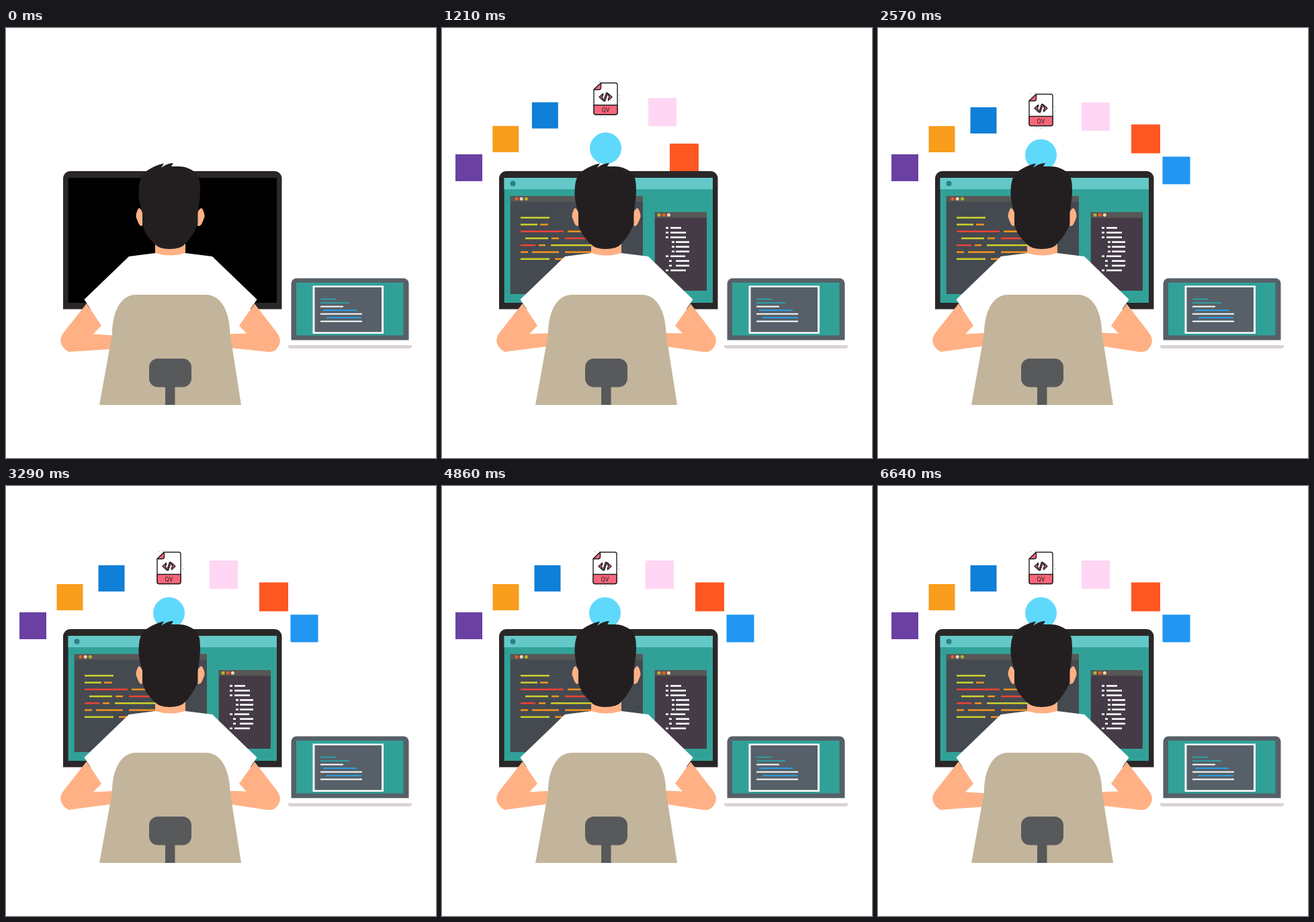
Write an HTML page with a canvas that moves like this. It is 640 px wide and 640 px high and loops after 6.71 s.

```html
<!DOCTYPE html>
<html lang="en">
<head>
<meta charset="utf-8">
<title>At the desk</title>
<style>
  html, body { margin: 0; width: 100%; height: 100%; overflow: hidden; background: #fff; }
  canvas { display: block; width: 640px; height: 640px; }
</style>
</head>
<body>
<canvas id="stage" width="640" height="640"></canvas>
<script>
const ctx = document.getElementById('stage').getContext('2d');
const LOOP = 6710, STEP = LOOP / 94;
const SKIN = '#ffb185', TEAL = '#31a198', SLATE = '#576068';
const YELLOW = '#cfd22a', ORANGE = '#f7931e', RED = '#ef4136', BLUE = '#2a9fe8';
const HUB = { x: 232, y: 290 };

const clamp = v => Math.max(0, Math.min(1, v));
const progress = (t, start, length) => clamp((t - start) / length);
const outCubic = p => 1 - (1 - p) ** 3;
const outBack = p => 1 + 2.70158 * (p - 1) ** 3 + 1.70158 * (p - 1) ** 2;

function rect(x, y, w, h, color) {
  ctx.fillStyle = color;
  ctx.fillRect(x, y, w, h);
}

function round(x, y, w, h, radius, color) {
  ctx.fillStyle = color;
  ctx.beginPath();
  ctx.roundRect(x, y, w, h, radius);
  ctx.fill();
}

function disc(x, y, r, color) {
  ctx.fillStyle = color;
  ctx.beginPath();
  ctx.arc(x, y, r, 0, Math.PI * 2);
  ctx.fill();
}

function shape(d, color, outline) {
  const path = new Path2D(d);
  ctx.fillStyle = color;
  ctx.fill(path);
  if (outline) {
    ctx.strokeStyle = outline;
    ctx.lineWidth = 1.4;
    ctx.lineJoin = 'round';
    ctx.stroke(path);
  }
}

const bar = (x1, x2, y, h, color) => rect(x1, y - h / 2, x2 - x1, h, color);

const tile = (size, color) => () => rect(-size / 2, -size / 2, size, size, color);

function documentIcon() {
  shape('M-7 -23 H15 Q17.5 -23 17.5 -20 V21 Q17.5 24 15 24 H-15 Q-17.5 24 -17.5 21 V-13 Z', '#fff', '#231f20');
  shape('M-17.5 10 H17.5 V21 Q17.5 24 15 24 H-15 Q-17.5 24 -17.5 21 Z', '#f9667a', '#231f20');
  shape('M-7 -23 V-16 Q-7 -13 -10 -13 H-17.5 Z', '#f9667a', '#231f20');
  shape('M-4 -7 L-9.5 -2 L-4 3 V0 L-6 -2 L-4 -4 Z M4 -7 L9.5 -2 L4 3 V0 L6 -2 L4 -4 Z', '#f9667a', '#231f20');
  shape('M1 -8 H3 L-1 4 H-3 Z', '#f9667a', '#231f20');
  ctx.fillStyle = '#231f20';
  ctx.font = '9px Roboto, Arial, sans-serif';
  ctx.textAlign = 'center';
  ctx.fillText('QV', 0, 20.5);
  for (const [x, y] of [[-15, -24], [-9, -25], [20, -4], [21, 2], [-6, 27], [0, 28]]) {
    disc(x, y, 0.7, '#8cabb5');
  }
}

const icons = [
  { x: 40, y: 208, start: 385, draw: tile(40, '#6a41a3') },
  { x: 95, y: 165.5, start: 528, draw: tile(39, '#f99d1c') },
  { x: 157, y: 137.5, start: 652, draw: tile(39, '#0f7fd8') },
  { x: 242.5, y: 189, start: 785, draw: () => disc(0, 0, 23.5, '#5ed9fc') },
  { x: 242.5, y: 121.5, start: 785, draw: documentIcon },
  { x: 324, y: 132, start: 918, draw: tile(42, '#ffd6f3') },
  { x: 398.5, y: 165, start: 1052, draw: tile(43, '#ff5722') },
  { x: 444, y: 212, start: 1180, draw: tile(41, '#2196f3') }
];

function drawIcons(t) {
  for (const icon of icons) {
    if (t < icon.start) continue;
    const k = outBack(progress(t, icon.start, 708));
    ctx.save();
    ctx.translate(HUB.x + (icon.x - HUB.x) * k, HUB.y + (icon.y - HUB.y) * k);
    icon.draw();
    ctx.restore();
  }
}

// Each row lists runs of: start x, end x, colour
const codeRows = [
  [[117, 160, YELLOW]],
  [[117, 142, YELLOW], [146, 158, ORANGE]],
  [[117, 181, RED], [187, 225, ORANGE]],
  [[124, 158, YELLOW], [163, 174, ORANGE], [183, 225, RED]],
  [[117, 139, RED], [144, 154, ORANGE], [162, 225, YELLOW]],
  [[117, 128, ORANGE], [134, 174, ORANGE], [183, 225, ORANGE]],
  [[117, 160, YELLOW], [168, 190, ORANGE]]
];

// Each row: bullet x, text start, text end
const listRows = [
  [333, 340, 356], [333, 340, 363], [333, 340, 363],
  [342, 348, 368], [342, 348, 368], [342, 348, 368],
  [333, 340, 362], [338, 348, 368], [338, 348, 368], [333, 340, 363]
];

function pane(x, y, w, h, color, dots, alpha, content) {
  ctx.save();
  ctx.globalAlpha = alpha;
  ctx.beginPath();
  ctx.rect(x, y, w, h);
  ctx.clip();
  rect(x, y, w, h, color);
  content();
  ctx.globalAlpha = alpha;
  rect(x, y, w, 8.5, '#575756');
  dots.forEach((c, i) => disc(x + (w > 100 ? 9.5 : 6.5) + i * 7.2, y + 4.3, 2.5, c));
  ctx.restore();
}

function drawMonitor(t) {
  round(85, 213, 325.5, 205.5, [11, 11, 0, 0], '#2b2728');
  rect(92.5, 223, 310.5, 186, '#000');
  ctx.save();
  ctx.globalAlpha = progress(t, 40, 260);
  rect(92.5, 223, 310.5, 186, TEAL);
  rect(92.5, 223, 310.5, 17, '#65c8c8');
  disc(105.5, 231.5, 4, '#2d7f87');
  ctx.restore();

  pane(101.5, 250, 197.5, 146, '#444a50', ['#f15a24', '#fbd3a8', '#b5b52a'], progress(t, 200, 260), () => {
    const k = outCubic(progress(t, 600, 410));
    ctx.globalAlpha = k;
    codeRows.forEach((row, i) => {
      for (const [a, b, c] of row) bar(a, b, 282.3 + i * 10.25 + (1 - k) * 45, 2.5, c);
    });
  });

  pane(316.5, 274, 77.5, 117, '#453b47', ['#b5b52a', '#f15a24', '#fbd3a8'], progress(t, 330, 260), () => {
    const k = outCubic(progress(t, 735, 410));
    ctx.globalAlpha = k;
    listRows.forEach(([dot, a, b], i) => {
      const y = 297.5 + i * 7.03 + (1 - k) * 66;
      bar(dot, dot + 4, y, 2.6, '#fff');
      bar(a, b, y, 2.6, '#fff');
    });
  });
}

function drawLaptop() {
  round(424.5, 372.5, 175, 92, [8, 8, 0, 0], SLATE);
  rect(432, 379, 159.5, 78.5, TEAL);
  rect(456.5, 383.5, 105.5, 71.5, '#fff');
  rect(459.5, 386, 99.5, 66.5, SLATE);
  round(420, 472, 184, 5, [0, 0, 4, 4], '#d9d2d6');
  const rows = [
    [468, 491, '#2f9fa5'], [468, 511, '#2f9fa5'], [468, 502, '#fff'], [472, 522, BLUE],
    [468, 530, '#fff'], [477, 529, BLUE], [468, 530, '#fff']
  ];
  rows.forEach(([a, b, c], i) => bar(a, b, 403.6 + i * 5.5, 2, c));
}

function drawPerson(t) {
  const beat = Math.cos(t / LOOP * Math.PI * 18);
  const left = 455.7 + beat * 2.3, right = 454.5 + beat * 1.2;

  shape('M183 340 L222 335 H267 L307 340 L373.5 404 L347 443 L333 470 H158 L142 443 L116.5 404 Z', '#fff');
  shape(`M120 410 L142 443 L130 455.5 L165 ${left} V${left + 18} L156 ${left + 20} L93 482 Q81 475 81 464 Q82 458 86 453 Z`, SKIN);
  shape(`M370 410.5 L347 443 L358 454.5 L326 ${right} V${right + 18} L335 ${right + 20.5} L385 481.5 Q396 483 400 480 Q408 474 408 464 Q407 458 403 453 Z`, SKIN);

  shape('M222 310 H267 V335 Q244 342 222 335 Z', SKIN);
  shape('M203 274 C199 266 197 267 195 273 Q192 280 195 285 C197 291 200 297 203 294 Z', SKIN);
  shape('M285 274 C290 266 292 267 294 273 Q297 280 294 285 C292 291 289 297 285 294 Z', SKIN);
  shape('M203 275 C200 265 197 255 197.5 243 C198 227 201 217 212 211 Q223 204 235 201.5 L231 208 Q240 201 249 201 L246 206 C257 206 265 205 274 210 C287 216 289 225 289 241 C289 257 286 267 285.5 277 V292 C281 303 274 314 266 322 Q260 329 243 329 Q228 329 222 322 C213 314 205 304 203 291 Z', '#231f20');

  shape('M139 561 L158 456 C158 425 169 397 194 397 H297 C322 397 333 425 333.5 455 L350 561 Z', '#c3b59b');
  rect(237, 530, 14.5, 31, '#58595b');
  round(213, 492, 63, 42.5, 13, '#58595b');
}

function frame() {
  const now = performance.now() % LOOP;
  const t = Math.floor((now + 5) / STEP) * STEP % LOOP;
  rect(0, 0, 640, 640, '#fff');
  drawIcons(t);
  drawMonitor(t);
  drawLaptop();
  drawPerson(t);
  requestAnimationFrame(frame);
}
frame();
</script>
</body>
</html>
```
